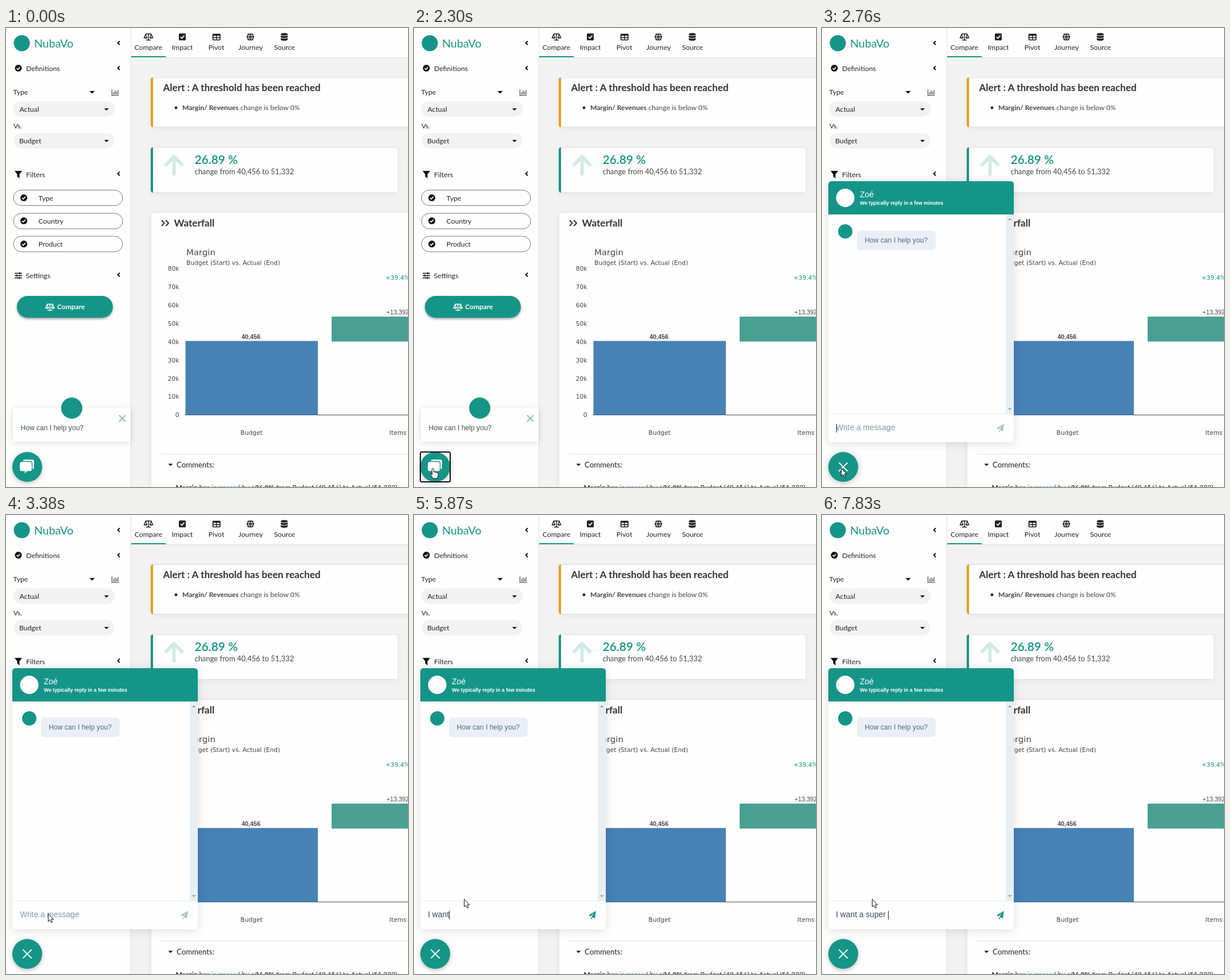
An HTML page for the animation above (8 s loop, 700 px wide and 800 px high).

```html
<!DOCTYPE html>
<html lang="en">
<head>
<meta charset="utf-8">
<title>Dashboard chat</title>
<style>
  html, body { margin: 0; width: 100%; height: 100%; overflow: hidden; background: #f2f2f2; }
  svg { display: block; width: 700px; height: 800px; }
  text { font: 12.2px Lato, sans-serif; fill: #222; white-space: pre; }
  .mid { text-anchor: middle; }
  .h { font-size: 17.1px; font-weight: 700; fill: #333; }
  .plot text { font: 10.65px "DejaVu Sans", sans-serif; fill: #444; }
  .plot .value { font: 10.7px "Liberation Sans", Arial, sans-serif; }
  .chat text { font: 12.1px "Liberation Sans", Arial, sans-serif; fill: #4a4f55; }
  .chat .input { font-size: 13.8px; }
  text.bold, tspan.bold, .plot .value.bold, .chat text.bold { font-weight: 700; }
  .teal, .plot text.teal { fill: #159588; }
  .line { fill: none; stroke: #111; stroke-width: 2; }
  .card { fill: #fefefe; stroke: #e3e3e3; filter: drop-shadow(0 2px 4px #0000000d); }
  .float { filter: drop-shadow(0 2px 6px #0002); }
</style>
</head>
<body>
<svg viewBox="0 0 700 800">
  <defs>
    <g id="scale" fill="none" stroke="currentColor" stroke-width="1.4">
      <path d="M-5.5-4.5H5.5M0-6V5.5M-4 6H4M-5-4L-7.5 2H-2.5ZM5-4L2.5 2H7.5Z"/>
      <path d="M-7.7 2H-2.3Q-5 5-7.7 2ZM2.3 2H7.7Q5 5 2.3 2Z" fill="currentColor" stroke="none"/>
    </g>
    <g id="tick"><circle r="6" fill="#111"/><path d="M-3 0L-1 2.2 3-2" fill="none" stroke="#fff" stroke-width="1.7"/></g>
    <path id="fold" class="line" d="M2-3.3L-1.3 0 2 3.3"/>
    <path id="drop" d="M-4-2H4L0 2Z" fill="#111"/>
  </defs>

  <rect width="700" height="800" fill="#f2f2f2"/>

  <!-- Navigation -->
  <rect x="217" width="483" height="51" fill="#fefefe"/>
  <path d="M218 51.5H700" stroke="#e2e2e2"/>
  <rect x="218" y="49" width="60" height="2" class="teal"/>
  <g class="mid">
    <text x="248" y="38">Compare</text><text x="307" y="38">Impact</text><text x="366.3" y="38">Pivot</text>
    <text x="426" y="38">Journey</text><text x="485" y="38">Source</text>
  </g>
  <use href="#scale" x="248" y="15" color="#222"/>
  <g fill="#222">
    <rect x="301" y="9.5" width="12" height="12" rx="1.5"/>
    <rect x="359.500" y="10" width="14" height="11.5" rx="1.5"/>
    <circle cx="425.5" cy="15.5" r="6.6"/>
    <path d="M478.5 11C478.5 8 490.5 8 490.5 11V20C490.5 23 478.5 23 478.5 20Z"/>
  </g>
  <g fill="none" stroke="#fff">
    <path d="M304 15.5L306.3 18 310.5 13" stroke-width="1.7"/>
    <path d="M361.3 14.7H371.7M361.3 18.7H371.7" stroke-width="2.4"/>
    <path d="M366.5 13V21" stroke="#222" stroke-width="1.6"/>
    <path d="M419 13.5H432M419 17.7H432M425.5 9C421.5 12 421.5 19 425.5 22 429.5 19 429.5 12 425.5 9" stroke-width=".9"/>
    <path d="M478 12.5Q484.5 15 491 12.5M478 17Q484.5 19.5 491 17"/>
  </g>

  <!-- Sidebar -->
  <rect width="217" height="800" fill="#fefefe"/>
  <path d="M217.5 0V800" stroke="#e0e0e0"/>
  <circle cx="27.5" cy="26.5" r="14" class="teal"/>
  <text x="49" y="34" class="teal" style="font-size:19.7px">NubaVo</text>
  <use href="#fold" x="196" y="26"/><use href="#fold" x="196" y="70"/>
  <use href="#fold" x="196" y="254"/><use href="#fold" x="196" y="430"/>
  <use href="#tick" x="21.5" y="70"/><text x="35" y="75">Definitions</text>
  <text x="12.5" y="116">Type</text>
  <use href="#drop" transform="translate(150 112) scale(1.15)"/>
  <path d="M184.5 107V117.5H196.5M187.5 116V112M190 116V109M192.5 116V111M195 116V108" class="line" style="stroke-width:1.2;stroke:#444"/>
  <rect x="13" y="128" width="176" height="27" rx="13.5" fill="#f2f2f2"/>
  <rect x="13" y="183" width="176" height="27" rx="13.5" fill="#f2f2f2"/>
  <text x="23.5" y="146">Actual</text><text x="13" y="175" style="font-size:11.6px">Vs.</text><text x="23" y="201">Budget</text>
  <use href="#drop" x="175" y="142"/><use href="#drop" x="175" y="197"/>
  <path d="M15 249H28L23.5 255V262L19.5 259V255Z" fill="#111"/>
  <text x="35" y="259.5">Filters</text>
  <g fill="#fefefe" stroke="#777">
    <rect x="13" y="282.5" width="190" height="27" rx="13.5"/>
    <rect x="13" y="323" width="190" height="27" rx="13.5"/>
    <rect x="13" y="363" width="190" height="27" rx="13.5"/>
  </g>
  <use href="#tick" x="31" y="296"/><use href="#tick" x="31" y="336"/><use href="#tick" x="31" y="376.5"/>
  <text x="56.5" y="300.5">Type</text><text x="56.5" y="341">Country</text><text x="56.5" y="381">Product</text>
  <path d="M15 427.5H28M15 431.5H28M15 435.5H28M24 425.5V429.5M19 429.5V433.5M23 433.5V437.5" class="line" style="stroke-width:1.4"/>
  <text x="34.5" y="435.5">Settings</text>
  <rect x="19" y="467" width="167" height="38" rx="19" class="teal" style="filter:drop-shadow(0 2px 2px #0006)"/>
  <use href="#scale" x="76.5" y="486" color="#fff"/>
  <text x="89" y="490" class="bold" style="fill:#fff;font-size:12px">Compare</text>

  <!-- Cards -->
  <rect x="252.5" y="86.5" width="470" height="86" rx="5" class="card"/>
  <path d="M256 86V173Q252 173 252 168V91Q252 86 256 86" fill="#f39c12"/>
  <text x="273.5" y="110" class="h">Alert : A threshold has been reached</text>
  <circle cx="296" cy="139" r="2.5" fill="#333"/>
  <text x="307" y="143" style="font-size:12.05px;fill:#444"><tspan class="bold">Margin/ Revenues</tspan> change is below 0%</text>

  <rect x="252.5" y="208.5" width="430" height="78" rx="5" class="card"/>
  <path d="M256 208V287Q252 287 252 282V213Q252 208 256 208" class="teal"/>
  <path d="M277 240L292.5 224.5 308 240M292.5 225V257" fill="none" stroke="#d0eae7" stroke-width="6"/>
  <text x="328.5" y="236.5" class="teal" style="font-size:20.8px;font-weight:600">26.89 %</text>
  <text x="328.5" y="255" style="font-size:12.9px;fill:#444">change from 40,456 to 51,332</text>

  <rect x="252.5" y="321.5" width="470" height="500" rx="5" class="card"/>
  <path d="M271 335L275.5 340 271 345M278.5 335L283 340 278.5 345" class="line" style="stroke:#333"/>
  <text x="292.5" y="345.5" class="h">Waterfall</text>
  <g class="plot">
    <text x="314" y="396" style="font-size:14.8px">Margin</text>
    <text x="314" y="413">Budget (Start) vs. Actual (End)</text>
    <g id="ticks" text-anchor="end"></g>
    <path d="M312 674.5H700" stroke="#544a58"/>
    <rect x="312.5" y="545.5" width="230.5" height="129" fill="#4682b4"/>
    <rect x="567" y="503" width="231" height="43.5" fill="#49a093"/>
    <g class="mid">
      <text x="426.5" y="542" class="value bold">40,456</text>
      <text x="682" y="499" class="value">+13,392</text>
      <text x="682" y="439" class="teal">+39.4%</text>
      <text x="427.5" y="709">Budget</text><text x="682.5" y="709">Items</text>
    </g>
  </g>
  <path d="M270 742.5H700" stroke="#e2e2e2"/>
  <use href="#drop" x="286.5" y="761.5"/>
  <text x="297" y="766" style="font-size:13.2px">Comments:</text>
  <text x="295.5" y="804.5" style="font-size:12.05px"><tspan class="bold">Margin</tspan> has <tspan class="teal">increased</tspan> by <tspan class="bold">+26.9%</tspan> from Budget (40,456) to Actual (51,332)</text>

  <!-- Chat -->
  <g class="chat">
    <g id="teaser">
      <rect x="12" y="662" width="205" height="59" rx="2" fill="#fefefe" class="float"/>
      <circle cx="114.5" cy="662.5" r="18.5" class="teal"/>
      <text x="25.5" y="701">How can I help you?</text>
      <path d="M197 675L208 686M208 675L197 686" stroke="#6aa9b5" stroke-width="1.5"/>
    </g>

    <g id="panel">
      <rect x="11" y="267" width="323" height="455" rx="6" fill="#fefefe" style="filter:drop-shadow(0 2px 8px #0002)"/>
      <path d="M11 325V273Q11 267 17 267H328Q334 267 334 273V325Z" class="teal"/>
      <circle cx="40.5" cy="296" r="16" fill="#fff"/>
      <text x="66" y="295" style="font-size:14px;fill:#fff">Zoé</text>
      <text x="66" y="308" class="bold" style="font-size:8.8px;fill:#fff">We typically reply in a few minutes</text>
      <rect x="320" y="325" width="14" height="348" fill="#e9eef2"/>
      <path d="M323.5 335H330.5L327 331.5ZM323.5 662.5H330.5L327 666Z" fill="#9aa5ad"/>
      <circle cx="40.5" cy="354.5" r="12.5" class="teal"/>
      <rect x="61" y="353" width="137" height="34" rx="6" fill="#eaeff7"/>
      <text x="74.5" y="374" style="fill:#4d6c80">How can I help you?</text>
      <path d="M11 672.5H334" stroke="#e8ecef"/>
      <text id="message" class="input" x="24.2" y="701"></text>
      <rect id="caret" y="690" width="1" height="15" fill="#222"/>
      <path id="send" d="M317 690L304 697.6 307.5 699.5 314.5 693 309 700.3 314.8 703ZM308.3 701V705.5L311 702.3Z"/>
    </g>

    <circle id="button" cx="37" cy="765" r="26" class="teal"/>
    <g id="bubbles" fill="#fff" stroke="#159588" stroke-width="1.3">
      <rect x="28.5" y="751.5" width="21" height="18" rx="4"/>
      <path d="M27.5 755.5H41.5Q45.5 755.5 45.5 759.5V769Q45.5 773 41.5 773H37L32 778V773H27.5Q23.5 773 23.5 769V759.5Q23.5 755.5 27.5 755.5Z"/>
    </g>
    <path id="close" d="M29.5 757.5L44.5 772.5M44.5 757.5L29.5 772.5" stroke="#fff" stroke-width="1.8"/>
    <rect id="focus" x="11" y="739" width="52" height="52" rx="2.5" class="line"/>
  </g>

  <g id="pointer" fill="#fff" stroke="#111" stroke-linejoin="round">
    <path id="arrow" d="M.5.5V14L3.5 11.3 5.8 16 7.9 15 5.7 10.3H9.8Z"/>
    <path id="hand" d="M-1.5 1.5Q0-1.5 1.5 1.5V7Q3 5.5 4.5 7.5 6 6.5 7 8.5 8.5 7.5 9 9.5V13.5L7.5 18H0L-4 12Q-4 9.5-1.5 11.5Z"/>
  </g>
</svg>
<script>
const el = id => document.getElementById(id);
const show = (id, on) => el(id).style.display = on ? "" : "none";

el("ticks").innerHTML = Array.from({ length: 9 }, (_, i) =>
  `<text x="301.5" y="${678.3 - i * 31.9}">${i ? i * 10 + "k" : 0}</text>`).join("");

const DURATION = 8000, PRESS = 2300, OPEN = 2450;
const words = "I want a super ";
const keyTimes = [4860, 5010, 5260, 5560, 5720, 5870, 6270, 6500, 6580, 6890, 6960, 7210, 7280, 7450, 7830];
const easeOut = p => 1 - (1 - p) ** 2;
const smooth = p => p * p * (3 - 2 * p);
// Progress held between evenly spaced updates
const stepped = (t, start, step, count) =>
  Math.min(count, Math.max(0, Math.floor((t - start) / step))) / count;

function pointerAt(t) {
  if (t < 430 || (t >= 830 && t < 980)) return null;
  if (t < 510) return [494, 790];
  if (t < 730) return [382, 790];
  if (t < 830) return [389, 794];
  if (t < 3140) {
    const p = easeOut(stepped(t, 980, 75.7, 7)), q = 1 - p;
    const curve = (a, b, c) => q * q * a + 2 * q * p * b + p * p * c;
    return [curve(309, 120, 33), curve(781, 674, 767)];
  }
  const p = smooth(stepped(t, 3060, 80, 6));
  return [33 + 54 * p, 767 - 98 * p];
}

function draw(t) {
  const open = t >= OPEN, pos = pointerAt(t);
  show("teaser", !open);
  show("panel", open);
  show("bubbles", !open);
  show("close", open);
  show("focus", t >= PRESS && !open);
  el("panel").setAttribute("transform", `translate(0 ${7 * (1 - stepped(t, OPEN, 77.5, 4)) ** 2})`);

  const typed = words.slice(0, keyTimes.filter(k => k <= t).length);
  const message = el("message");
  message.textContent = typed || "Write a message";
  message.style.fill = typed ? "#34495e" : "#7d9cb0";
  el("send").setAttribute("fill", typed ? "#159588" : "#a9c0d0");
  el("caret").setAttribute("x", typed ? Math.round(24.2 + message.getComputedTextLength()) : 25);
  show("caret", typed || t < 2990 || (t - 2990) % 1000 >= 550);

  show("pointer", pos);
  const hover = pos && Math.hypot(pos[0] - 37, pos[1] - 765) < 26;
  el("button").style.filter = `drop-shadow(0 2px ${hover ? 6 : 4}px #0004)`;
  if (!pos) return;
  el("pointer").setAttribute("transform", `translate(${pos})`);
  show("hand", hover && !open);
  show("arrow", !hover || open);
}

const start = performance.now();
function frame() {
  draw((performance.now() - start) % DURATION);
  requestAnimationFrame(frame);
}
frame();
</script>
</body>
</html>
```
